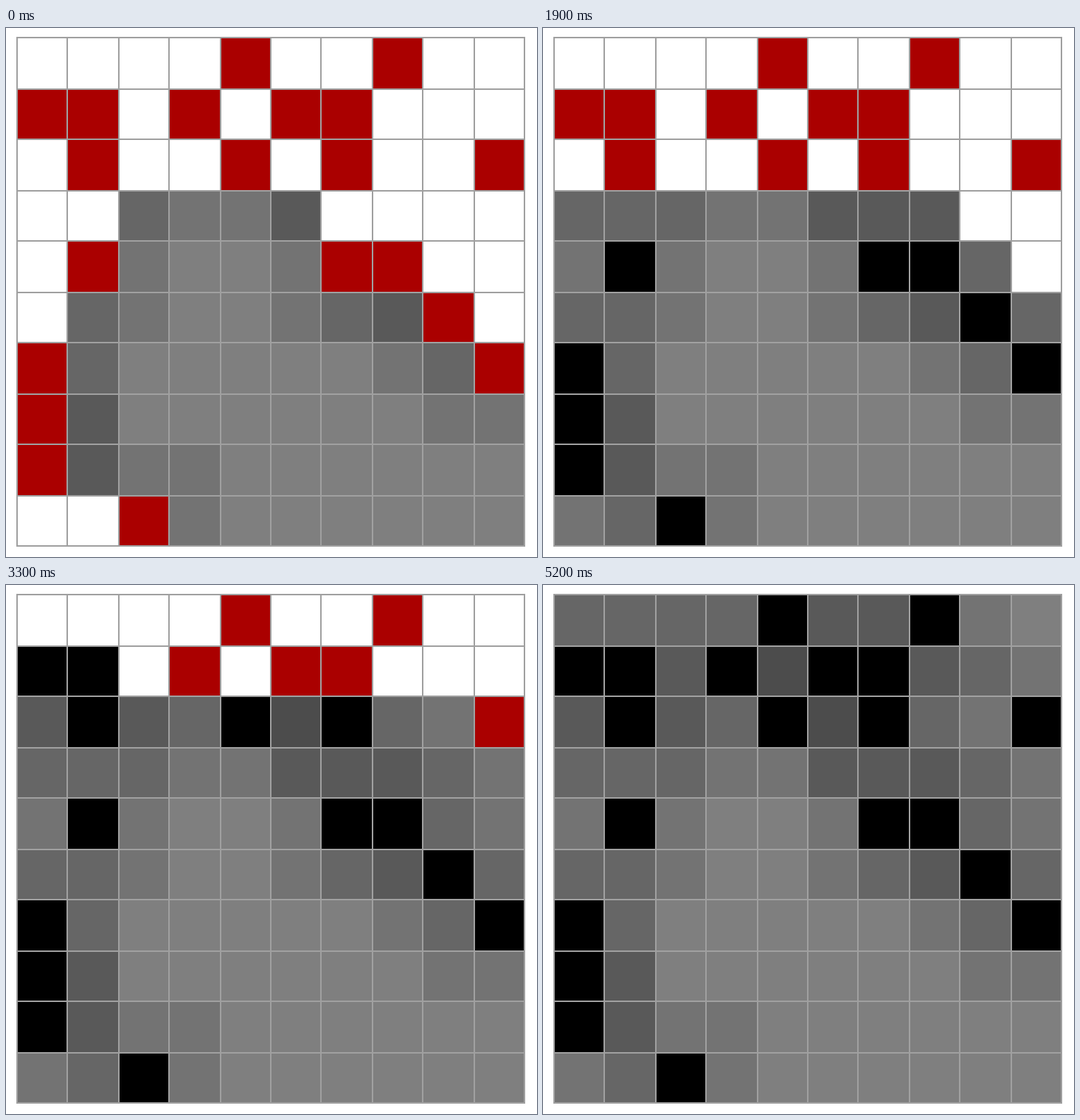
Animation, 720 px wide and 718 px high, one loop 5.3 s. Source, as an HTML page with a canvas:

```html
<!DOCTYPE html>
<html lang="en">
<head>
<meta charset="utf-8">
<title>Mine field solver</title>
<style>
  html, body { margin: 0; overflow: hidden; background: #fff; }
  canvas { display: block; }
</style>
</head>
<body>
<canvas width="720" height="718"></canvas>
<script>
const ctx = document.querySelector('canvas').getContext('2d');
const SIZE = 10, STEP = 100;
const SAFE = 1, MINE = 2;

const field = `
  ....#..#..
  ##.#.##...
  .#..#.#..#
  ..........
  .#....##..
  ........#.
  #........#
  #.........
  #.........
  ..#.......`.replace(/\s/g, '');

const all = [...field].map((_, i) => i);
const rowOf = i => Math.floor(i / SIZE), colOf = i => i % SIZE;
const near = all.map(i => all.filter(j => j !== i &&
  Math.abs(rowOf(i) - rowOf(j)) < 2 && Math.abs(colOf(i) - colOf(j)) < 2));
const isMine = i => field[i] === '#';
const counts = near.map(list => list.filter(isMine).length);

// Opens a cell and, if it touches no mine, everything around it.
function flood(known, i) {
  if (known[i]) return;
  known[i] = SAFE;
  if (!counts[i]) near[i].forEach(j => flood(known, j));
}

// What each opened number alone tells about its hidden neighbours.
function infer(known, opened) {
  const mines = new Set(), safe = new Set();
  for (const i of opened) {
    const hidden = near[i].filter(j => !known[j]);
    const left = counts[i] - near[i].filter(j => known[j] === MINE).length;
    if (left < 0 || left > hidden.length) return null;
    if (left === 0) hidden.forEach(j => safe.add(j));
    else if (left === hidden.length) hidden.forEach(j => mines.add(j));
  }
  return { mines, safe };
}

// True if a mine in this cell would contradict the opened numbers.
function cannotBeMine(known, opened, cell) {
  const trial = [...known];
  trial[cell] = MINE;
  for (;;) {
    const found = infer(trial, opened);
    if (!found) return true;
    if (!found.mines.size && !found.safe.size) return false;
    found.mines.forEach(j => trial[j] = MINE);
    found.safe.forEach(j => trial[j] = SAFE);
  }
}

// Plays the field in batches: sure mines, sure safe cells, proofs, a guess.
function solve(known) {
  const order = [];
  while (known.includes(0)) {
    const opened = all.filter(i => known[i] === SAFE);
    const hidden = all.filter(i => !known[i]);
    const touching = i => near[i].filter(j => known[j] === SAFE).length;
    const { mines, safe } = infer(known, opened);
    let batch = [...(mines.size ? mines : safe)];
    if (!batch.length) batch = hidden.filter(i => cannotBeMine(known, opened, i));
    if (!batch.length) {
      batch = hidden.filter(i => !isMine(i))
        .sort((a, b) => touching(b) - touching(a)).slice(0, 1);
    }
    batch.sort((a, b) => a - b);
    batch.forEach(i => known[i] = isMine(i) ? MINE : SAFE);
    order.push(...batch);
  }
  return order;
}

const known = all.map(() => 0);
flood(known, all.length - 1);
const order = solve(known);
const solvedAt = all.map(i => order.indexOf(i) + 1);
const LOOP = (order.length + 1) * STEP;

// Left and top edges of the 2px grid lines.
const lineX = col => 14 + 2 * Math.round(34.4 * col);
const lineY = row => 12 + 2 * Math.round(34.5 * row);

function cellColor(i, step) {
  const solved = solvedAt[i] <= step;
  if (isMine(i)) return solved ? '#000' : '#a00';
  if (!solved) return '#fff';
  const grey = Math.ceil(127 - 12.75 * counts[i]);
  return `rgb(${grey}, ${grey}, ${grey})`;
}

function draw(step) {
  ctx.fillStyle = '#fff';
  ctx.fillRect(0, 0, 720, 718);
  ctx.fillStyle = '#a0a0a0';
  ctx.fillRect(14, 12, 690, 692);
  for (const i of all) {
    const row = rowOf(i), col = colOf(i);
    const x = lineX(col) + 2, y = lineY(row) + 2;
    ctx.fillStyle = cellColor(i, step);
    ctx.fillRect(x, y, lineX(col + 1) - x, lineY(row + 1) - y);
  }
}

const start = performance.now();
function tick() {
  draw(Math.floor((performance.now() - start) % LOOP / STEP));
  requestAnimationFrame(tick);
}
tick();
</script>
</body>
</html>
```
